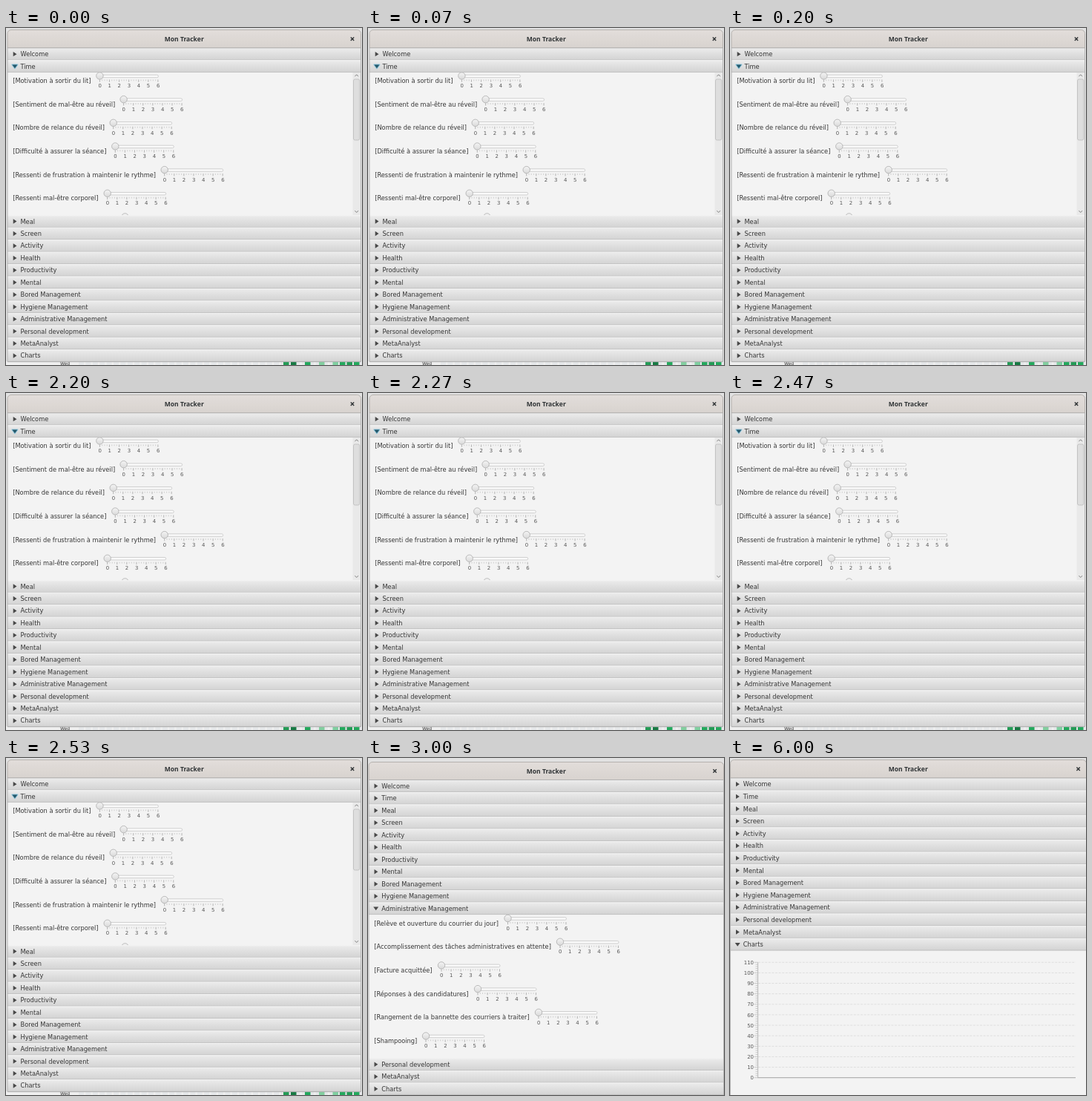
Recreate the animation shown at these times as an HTML page with a canvas. Size 480 by 454 pixels, loop 8.99 s.

```html
<!DOCTYPE html>
<html lang="fr">
<head>
<meta charset="utf-8">
<title>Mon Tracker</title>
<style>
html, body { margin: 0; width: 100%; height: 100%; overflow: hidden; background: #e4e4e4; }
canvas { display: block; }
</style>
</head>
<body>
<canvas id="stage" width="480" height="454"></canvas>
<script>
const c = document.getElementById('stage').getContext('2d');
const LOOP = 8990;
const FONT = '"DejaVu Sans", sans-serif';
const PANES = ['Welcome', 'Time', 'Meal', 'Screen', 'Activity', 'Health', 'Productivity', 'Mental',
  'Bored Management', 'Hygiene Management', 'Administrative Management',
  'Personal development', 'MetaAnalyst', 'Charts'];

const scenes = [
  { start: 0, left: 2, right: 478.5, top: 2.5, rowTop: 26.9, pitch: 16.45, bottom: 449.7,
    open: 1, height: 192.5, textX: 19.5, closeX: 467, focus: true, body: timePane },
  { start: 3000, left: 1, right: 479.5, top: 5.5, rowTop: 29.5, pitch: 16.5, bottom: 460,
    open: 10, height: 193.5, textX: 18.3, closeX: 467.6, body: adminPane },
  { start: 6000, left: 0.5, right: 480.5, top: 2.5, rowTop: 27, pitch: 16.6, bottom: 460,
    open: 13, height: 200, textX: 17.8, closeX: 469.6, body: chartPane }
];

function rect(x, y, w, h, fill) {
  c.fillStyle = fill;
  c.fillRect(x, y, w, h);
}

function fade(y, h, ...colors) {
  const g = c.createLinearGradient(0, y, 0, y + h);
  colors.forEach((color, i) => g.addColorStop(i / (colors.length - 1), color));
  return g;
}

function box(x, y, w, h, r, fill, stroke) {
  c.beginPath();
  c.roundRect(x, y, w, h, r);
  c.fillStyle = fill;
  c.fill();
  c.strokeStyle = stroke;
  c.lineWidth = 0.8;
  c.stroke();
}

function line(x1, y1, x2, y2, color, width = 0.7) {
  c.beginPath();
  c.moveTo(x1, y1);
  c.lineTo(x2, y2);
  c.strokeStyle = color;
  c.lineWidth = width;
  c.stroke();
}

function text(s, x, y, size = 8.25, align = 'left', color = '#363636') {
  c.font = `${size}px ${FONT}`;
  c.textAlign = align;
  c.fillStyle = color;
  c.fillText(s, x, y);
}

function arrow(x, y, open, color) {
  c.beginPath();
  if (open) {
    c.moveTo(x - 3.5, y - 2.2);
    c.lineTo(x + 3.5, y - 2.2);
    c.lineTo(x, y + 2.6);
  } else {
    c.moveTo(x - 2.2, y - 3.2);
    c.lineTo(x + 2.6, y);
    c.lineTo(x - 2.2, y + 3.2);
  }
  c.closePath();
  c.fillStyle = color;
  c.fill();
}

function slider(label, x, y, knobX) {
  text(label, x, y + 9.5);
  box(knobX, y - 1.3, 79, 3.5, 1.7, '#fafafa', '#c6c6c6');
  for (let i = 0; i <= 24; i++) {
    const tx = knobX + i * 3.27;
    line(tx, y + 5, tx, y + (i % 4 ? 6.8 : 8.3), i % 4 ? '#bdbdbd' : '#999');
  }
  for (let i = 0; i <= 6; i++) text(i, knobX + 0.2 + i * 13.08, y + 15.7, 6.9, 'center', '#555');
  box(knobX - 4.7, y - 4.7, 9.4, 9.4, 4.7, fade(y - 5, 10, '#f5f5f5', '#d9d9d9'), '#ababab');
}

function sliders(list, x, y, pitch) {
  list.forEach(([label, knobX], i) => slider(label, x, y + i * pitch, knobX));
}

function chevron(x, y, dir) {
  line(x - 2.3, y + dir, x, y - dir, '#777', 0.9);
  line(x, y - dir, x + 2.3, y + dir, '#777', 0.9);
}

function timePane() {
  sliders([
    ['[Motivation à sortir du lit]', 126.4],
    ['[Sentiment de mal-être au réveil]', 158.6],
    ['[Nombre de relance du réveil]', 144.7],
    ['[Difficulté à assurer la séance]', 147.3],
    ['[Ressenti de frustration à maintenir le rythme]', 213.7],
    ['[Ressenti mal-être corporel]', 136.7],
    ['', 160.5]
  ], 9.2, 64.5, 31.65);
  rect(467.5, 60, 10.5, 192, '#e9e9e9');
  box(468.5, 69, 8.3, 82, 2, '#dedede', '#bcbcbc');
  chevron(472.7, 64, 1.2);
  chevron(472.7, 247.3, -1.2);
}

function adminPane() {
  sliders([
    ['[Relève et ouverture du courrier du jour]', 188.5],
    ['[Accomplissement des tâches administratives en attente]', 259],
    ['[Facture acquittée]', 99],
    ['[Réponses à des candidatures]', 148],
    ['[Rangement de la bannette des courriers à traiter]', 230],
    ['[Shampooing]', 78]
  ], 8.2, 216, 31.7);
}

function chartPane() {
  const base = 430.7, step = 14.13;
  for (let v = 0; v <= 110; v += 2) {
    const y = base - v / 10 * step, major = v % 10 === 0;
    line(major ? 32.5 : 34.5, y, 37.5, y, '#b5b5b5');
    if (!major) continue;
    text(v, 32, y + 2.6, 6.9, 'right', '#555');
    c.setLineDash([3, 1.6]);
    if (v) line(38, y, 466, y, '#d6d6d6');
    c.setLineDash([]);
  }
  line(37.6, base - 11 * step, 37.6, base, '#b5b5b5', 0.9);
  line(37.2, base, 466, base, '#b2b2b2', 1.3);
}

function desktop() {
  rect(0, 0, 480, 454, '#e2e2e2');
  rect(0, 449, 480, 5, '#f0f0f0');
  for (let x = 98; x < 478; x += 9.4) rect(x, 450, 7, 4, '#e6e8ea');
  text('Wed', 73, 454.3, 6, 'left', '#333');
  const greens = [[374, '#229b55'], [384, '#167a43'], [403, '#22a95c'], [422, '#82cf9f'],
    [440.5, '#7fd0a0'], [450, '#22a95c'], [459.5, '#229b55'], [469, '#22a95c']];
  for (const [x, color] of greens) rect(x, 449, 7.5, 5, color);
}

function titleBar(s) {
  const { left, right, top, rowTop } = s, mid = (top + rowTop) / 2;
  box(left, top, right - left, rowTop - top, [5, 5, 0, 0],
    fade(top, rowTop - top, '#e2ddda', '#d8d3cf'), '#aaa6a3');
  c.font = 'bold 8.5px "Noto Sans", "Open Sans", sans-serif';
  c.textAlign = 'center';
  c.fillStyle = '#303436';
  c.fillText('Mon Tracker', 240.3, mid + 3.4);
  for (const d of [-2.2, 2.2]) line(s.closeX - 2.2, mid - d, s.closeX + 2.2, mid + d, '#303436', 1.4);
}

function paneHeader(s, i, y) {
  const { left, right, pitch } = s, open = i === s.open, mid = y + pitch / 2, x = s.textX - 7.6;
  rect(left, y, right - left, pitch, fade(y, pitch, '#ececec', '#dfdfdf', '#d3d3d3'));
  line(left, y + 0.6, right, y + 0.6, '#f4f4f4', 0.8);
  line(left, y + pitch - 0.4, right, y + pitch - 0.4, '#bcbcbc', 0.8);
  if (open && s.focus) {
    c.lineWidth = 2;
    c.lineJoin = 'round';
    c.strokeStyle = '#8fc4da';
    arrow(x, mid, true, '#24586b');
    c.stroke();
  }
  arrow(x, mid, open, open && s.focus ? '#24586b' : '#484848');
  text(PANES[i], s.textX, mid + 3);
}

function render(time) {
  const s = scenes.findLast(scene => time >= scene.start);
  desktop();
  rect(s.left, s.rowTop, s.right - s.left, s.bottom - s.rowTop, '#f3f3f3');
  titleBar(s);
  PANES.forEach((_, i) => {
    const y = s.rowTop + i * s.pitch;
    paneHeader(s, i, y + (i > s.open ? s.height : 0));
    if (i !== s.open) return;
    c.save();
    c.beginPath();
    c.rect(s.left, y + s.pitch, s.right - s.left, s.height);
    c.clip();
    s.body();
    c.restore();
  });
  c.strokeStyle = '#a9a9a9';
  c.lineWidth = 0.8;
  c.strokeRect(s.left, s.rowTop, s.right - s.left, s.bottom - s.rowTop);
}

const begin = performance.now();
function tick() {
  render((performance.now() - begin) % LOOP);
  requestAnimationFrame(tick);
}
tick();
</script>
</body>
</html>
```
